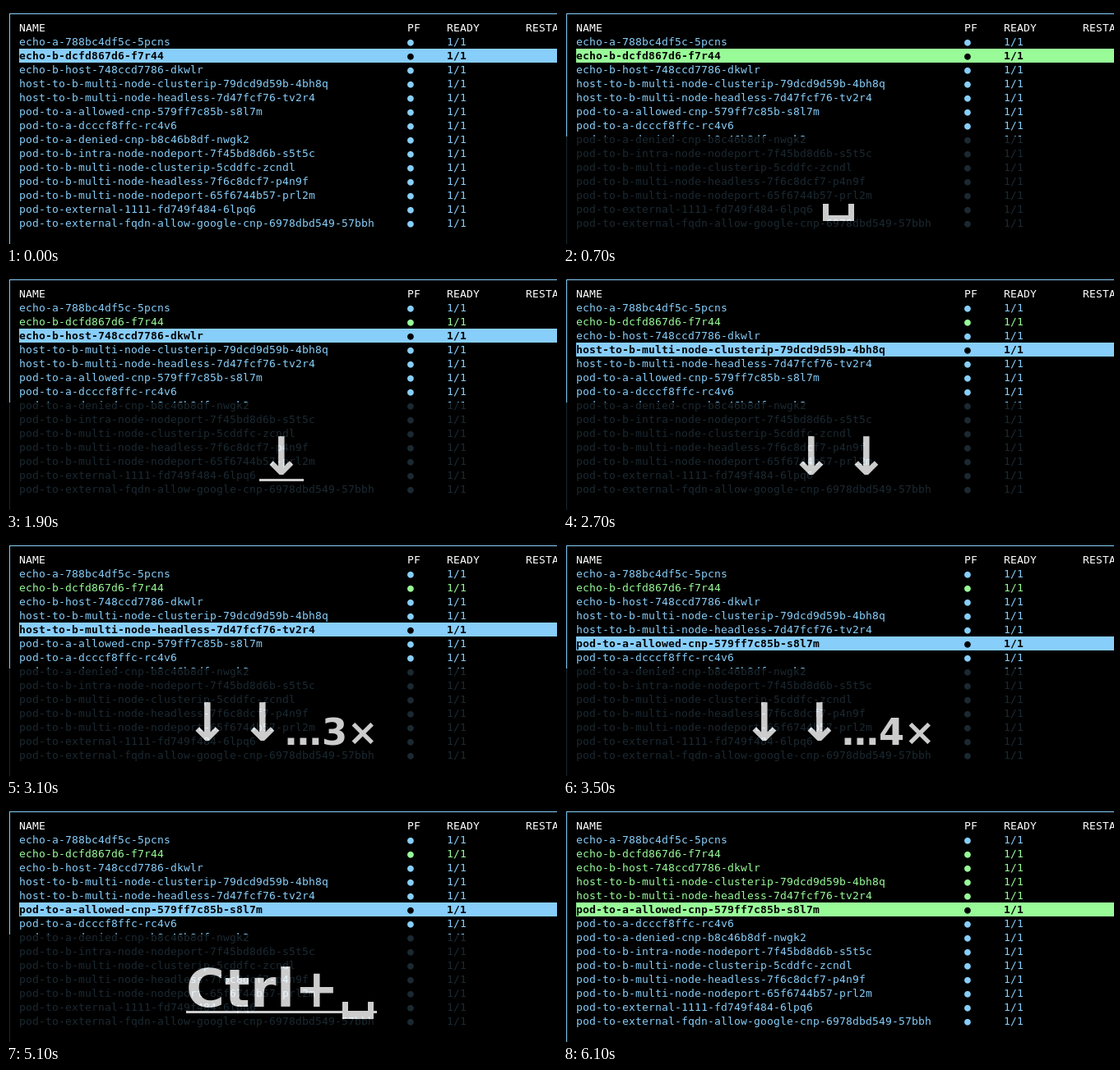
Animation, 670 px wide and 290 px high, one loop 8 s. Source, as an HTML page with a canvas:

```html
<!DOCTYPE html>
<html lang="en">
<head>
<meta charset="utf-8">
<title>Pod list</title>
<style>
html, body { margin: 0; width: 100%; height: 100%; overflow: hidden; background: #000; }
canvas { display: block; }
</style>
</head>
<body>
<canvas id="stage" width="670" height="290"></canvas>
<script>
const W = 670, H = 290, LOOP = 8000;
const CELL = 8, LINE = 17, LEFT = 16, TOP = 18;
const BLUE = '#87cefa', GREEN = '#98fb98';
const PANEL_Y = 159, BASE = 247;
const BIG = 64, SMALL = 44.8;

const ctx = document.getElementById('stage').getContext('2d', { alpha: false });
const panel = document.createElement('canvas');
panel.width = W;
panel.height = H - PANEL_Y;
const pctx = panel.getContext('2d', { alpha: false });

const pods = [
  'echo-a-788bc4df5c-5pcns',
  'echo-b-dcfd867d6-f7r44',
  'echo-b-host-748ccd7786-dkwlr',
  'host-to-b-multi-node-clusterip-79dcd9d59b-4bh8q',
  'host-to-b-multi-node-headless-7d47fcf76-tv2r4',
  'pod-to-a-allowed-cnp-579ff7c85b-s8l7m',
  'pod-to-a-dcccf8ffc-rc4v6',
  'pod-to-a-denied-cnp-b8c46b8df-nwgk2',
  'pod-to-b-intra-node-nodeport-7f45bd8d6b-s5t5c',
  'pod-to-b-multi-node-clusterip-5cddfc-zcndl',
  'pod-to-b-multi-node-headless-7f6c8dcf7-p4n9f',
  'pod-to-b-multi-node-nodeport-65f6744b57-prl2m',
  'pod-to-external-1111-fd749f484-6lpq6',
  'pod-to-external-fqdn-allow-google-cnp-6978dbd549-57bbh'
];

// [start, selected row, last marked row]; marks begin at row 1
const listSteps = [
  [0, 1, 0], [500, 1, 1], [1900, 2, 1], [2300, 3, 1],
  [2900, 4, 1], [3300, 5, 1], [5200, 5, 5]
];

// [start, end, underline end, keys, repeat suffix]
const keySteps = [
  [500, 1500, 700, ['␣']],
  [1900, 2400, 2100, ['↓']],
  [2400, 2900, 2700, ['↓', '↓']],
  [2900, 3300, 3100, ['↓', '↓'], '…3×'],
  [3300, 4300, 3500, ['↓', '↓'], '…4×'],
  [5100, 6100, 5300, ['Ctrl+␣']]
];

function print(text, col, row, color, bold) {
  ctx.font = (bold ? 'bold ' : '') + '13px "DejaVu Sans Mono", monospace';
  ctx.fillStyle = color;
  [...text].forEach((ch, i) => ctx.fillText(ch, LEFT + (col + i) * CELL, TOP + row * LINE + 13));
}

function drawRow(i, selected, marked) {
  const tint = marked ? GREEN : BLUE;
  if (selected) {
    ctx.fillStyle = tint;
    ctx.fillRect(LEFT, TOP + (i + 1) * LINE, W - LEFT, LINE);
  }
  const color = selected ? '#000' : tint;
  print(pods[i], 0, i + 1, color, selected);
  print('●', 59, i + 1, color, selected);
  print('1/1', 65, i + 1, color, selected);
}

function drawList(t) {
  const [, sel, last] = listSteps.filter(s => s[0] <= t).pop();
  ctx.fillStyle = '#000';
  ctx.fillRect(0, 0, W, H);
  ctx.fillStyle = BLUE;
  ctx.fillRect(4, 9, W, 1);
  ctx.fillRect(4, 9, 1, H);
  print('NAME', 0, 0, '#fff');
  print('PF', 59, 0, '#fff');
  print('READY', 65, 0, '#fff');
  print('RESTARTS', 77, 0, '#fff');
  pods.forEach((_, i) => drawRow(i, i === sel, i >= 1 && i <= last));
}

function setSize(size) {
  pctx.font = `bold ${size}px "DejaVu Sans", sans-serif`;
}

function advance(ch) {
  return ch === '␣' ? 46 : Math.round(pctx.measureText(ch).width);
}

function textWidth(text, size) {
  setSize(size);
  return [...text].reduce((sum, ch) => sum + advance(ch), 0);
}

function drawSpace(x, y) {
  pctx.fillRect(x + 4, y - 6, 7, 21);
  pctx.fillRect(x + 35, y - 6, 7, 21);
  pctx.fillRect(x + 4, y + 8, 38, 7);
}

function drawText(text, size, x, y) {
  setSize(size);
  for (const ch of text) {
    if (ch === '␣') drawSpace(x, y);
    else pctx.fillText(ch, x, y);
    x += advance(ch);
  }
}

function drawKeys(t) {
  const step = keySteps.find(s => t >= s[0] && t < s[1]);
  if (!step) return;
  const [, , lineEnd, keys, repeat] = step;
  const gap = 13;
  const parts = [];
  let x = 0;
  keys.forEach((text, i) => {
    if (i) x += gap;
    const w = textWidth(text, BIG);
    parts.push({ text, size: BIG, x, w, y: BASE, line: 252 });
    x += w;
  });
  if (repeat) {
    const w = textWidth(repeat, SMALL);
    parts.push({ text: repeat, size: SMALL, x, w, y: BASE + 5, line: 255 });
    x += w;
  }
  const start = Math.ceil((W - x) / 2);

  pctx.fillStyle = '#000';
  pctx.fillRect(0, 0, W, H);
  pctx.fillStyle = '#fff';
  for (const p of parts) drawText(p.text, p.size, start + p.x, p.y - PANEL_Y);
  if (t < lineEnd) {
    const p = parts[parts.length - 1];
    pctx.fillRect(start + p.x, p.line - PANEL_Y, p.w, 3);
  }
  ctx.globalAlpha = 0.8;
  ctx.drawImage(panel, 0, PANEL_Y);
  ctx.globalAlpha = 1;
}

const begin = performance.now();
function frame() {
  const t = (performance.now() - begin) % LOOP;
  drawList(t);
  drawKeys(t);
  requestAnimationFrame(frame);
}
frame();
</script>
</body>
</html>
```
